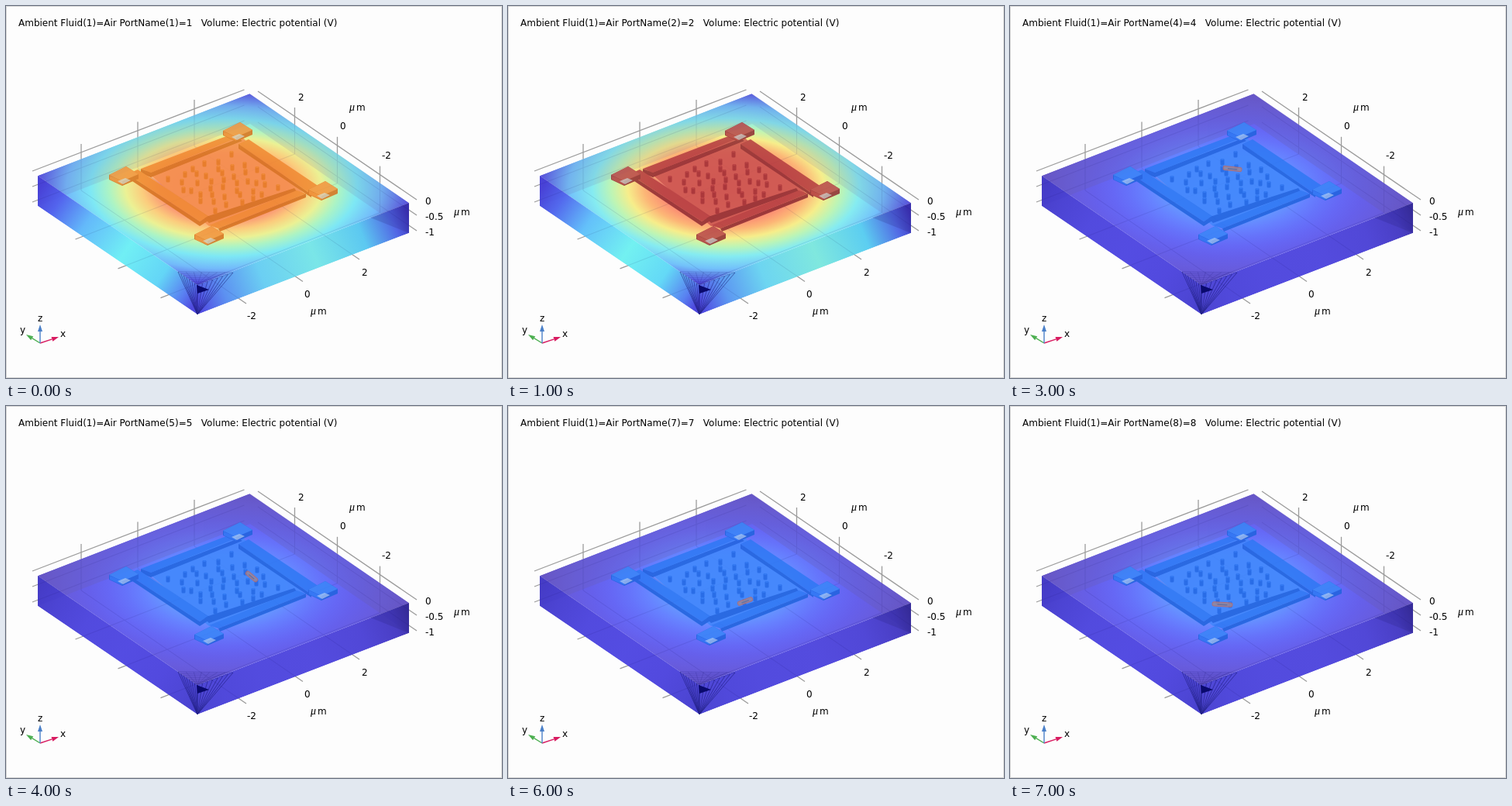
Recreate the animation shown at these times as an HTML page. Size 640 by 480 pixels, loop 8000 ms.

```html
<!DOCTYPE html>
<html lang="en">
<head>
<meta charset="utf-8">
<title>Electric potential sweep</title>
<style>
html, body { margin: 0; width: 100%; height: 100%; overflow: hidden; background: #fdfdfd; }
svg { display: block; width: 640px; height: 480px; }
text { font: 12px "DejaVu Sans", sans-serif; fill: #000; white-space: pre; }
.mu { font: italic 14px "Liberation Serif", serif; }
</style>
</head>
<body>
<svg id="stage" viewBox="0 0 640 480"></svg>
<script>
const svg = document.getElementById('stage');
const STEP = 1000, COUNT = 8;

function add(parent, tag, attrs, text) {
  const el = document.createElementNS('http://www.w3.org/2000/svg', tag);
  for (const k in attrs) el.setAttribute(k, attrs[k]);
  if (text !== undefined) el.textContent = text;
  parent.appendChild(el);
  return el;
}
const group = (attrs = {}, parent = svg) => add(parent, 'g', attrs);
const poly = (parent, points, fill, more) => add(parent, 'polygon', { points, fill, ...more });
const line = (parent, x1, y1, x2, y2, more) => add(parent, 'line', { x1, y1, x2, y2, ...more });

// Palettes: field = radial stops, left/right = wall stops
const fieldAt = [0, .34, .44, .53, .62, .72, .85, 1];
const wallAt = [0, .12, .3, .55, .78, .93, 1];
const palettes = {
  orange: {
    field: ['#f47a55', '#fa8a68', '#fbc873', '#eaf08c', '#a6f3c0', '#74e6f4', '#68b4fa', '#4a46e2'],
    left: ['#3c35d4', '#4658ec', '#58b4fa', '#66eef4', '#58d2f6', '#4c72f0', '#423cdc'],
    right: ['#4340e0', '#5088f0', '#60cbf2', '#70e4e6', '#50c4f0', '#4458e2', '#3227b8'],
    plate: '#f5904f', bar: '#f08a32', dark: '#d67220', pad: '#f2953f', pin: '#e67c22', band: .14
  },
  red: {
    field: ['#f0605a', '#fb8068', '#fcb06c', '#f6ec82', '#b8f4b0', '#7ceaf0', '#68bcfa', '#4a46e2'],
    left: ['#3c35d4', '#465eec', '#58bcfa', '#68f0f0', '#58d6f6', '#4c78f0', '#423cdc'],
    right: ['#4340e0', '#5090f0', '#62d2f0', '#76e6dc', '#50caf0', '#445ce2', '#3227b8'],
    plate: '#cb5550', bar: '#b43c40', dark: '#902c32', pad: '#b8484a', pin: '#a02e34', band: .14
  },
  blue: {
    field: ['#4f9bff', '#5a8eff', '#5b78ff', '#5a68fa', '#5a5cf4', '#5a54ea', '#5c50dc', '#5a48cc'],
    left: ['#3a30c4', '#3f36d0', '#453ddc', '#473fe0', '#453cdc', '#4038d2', '#3c34cc'],
    right: ['#4038d0', '#433bd8', '#463edc', '#473edc', '#443ad4', '#3c30c0', '#3024a0'],
    plate: '#4286fc', bar: '#2f78f4', dark: '#2163de', pad: '#3a86f8', pin: '#2166e4', band: .22
  }
};

const defs = add(svg, 'defs', {});
function gradient(tag, id, attrs, offsets) {
  const g = add(defs, tag, { id, gradientUnits: 'userSpaceOnUse', ...attrs });
  return offsets.map(offset => add(g, 'stop', { offset }));
}
const stops = {
  field: gradient('radialGradient', 'field', { cx: 51, cy: 51, r: 70 }, fieldAt),
  left: gradient('linearGradient', 'left', { x1: 41, y1: 239, x2: 247, y2: 379 }, wallAt),
  right: gradient('linearGradient', 'right', { x1: 247, y1: 379, x2: 520, y2: 273 }, wallAt)
};

// Background and grid
add(svg, 'rect', { x: .5, y: .5, width: 639, height: 479, fill: '#fdfdfd', stroke: '#d6d6d6' });
function drawGrid(parent) {
  for (let i = 0; i < 3; i++) {
    const xa = 97 + 73 * i, ya = 178 - 28.5 * i;
    line(parent, xa, ya, xa, ya + 60);
    line(parent, xa, ya + 60, xa + 213, ya + 206);
    const xb = 372.5 + 55 * i, yb = 131 + 37.8 * i;
    line(parent, xb, yb, xb, yb + 60);
    line(parent, xb, yb + 60, xb - 283, yb + 170);
    const z = 20 * i;
    line(parent, 34, 213 + z, 307.5, 108 + z);
    line(parent, 325, 110 + z, 530, 250 + z);
  }
}
drawGrid(group({ stroke: '#9c9c9c', 'stroke-width': 1.3 }));

// Block of air
const box = group();
const outline = '41,219 315,113 520,254 520,293 247,398 41,258';
poly(box, outline, '#fff', { opacity: .55 });
add(box, 'rect', {
  width: 100, height: 100, fill: 'url(#field)', opacity: .93,
  transform: 'matrix(2.73 -1.06 -2.06 -1.41 247 360)'
});
const bands = group({}, box);
poly(bands, '41,219 315,113 315,152 41,258', '#6a5aa0');
poly(bands, '315,113 520,254 520,293 315,152', '#6a5aa0');
poly(box, '41,219 247,360 247,398 41,258', 'url(#left)', { opacity: .93 });
poly(box, '247,360 520,254 520,293 247,398', 'url(#right)', { opacity: .93 });
drawGrid(group({ stroke: '#302a70', opacity: .1 }, box));
// Hide the part of the overlay that leaves the block
const clip = add(defs, 'clipPath', { id: 'block' });
add(clip, 'polygon', { points: outline });
box.setAttribute('clip-path', 'url(#block)');
poly(box, '470,273 520,254 520,293', '#20186c', { opacity: .18 });

// Fine mesh at the near corner
const mesh = group({ stroke: '#14146a', 'stroke-width': .7, opacity: .7 });
for (let i = 0; i <= 7; i++) {
  const t = i / 7;
  line(mesh, 247, 398, 222 + 25 * t, 343 + 17 * t);
  line(mesh, 247, 398, 247 + 46 * t, 360 - 16 * t);
  line(mesh, 222 + 25 * t, 343 + 17 * t, 293 - 46 * t, 344 + 16 * t, { opacity: .4 });
  line(mesh, 222 + 71 * t, 343 + t, 247, 360, { opacity: .35 });
}
poly(svg, '246,360 262,366 247,371', '#0a0a6e');

// Device
const device = group({ opacity: .86 });
const tinted = [];
function part(points, key, more) {
  tinted.push([poly(device, points, '', more), key]);
}
part('180,212 302,167 385,242 262,284', 'plate');
// rails: top face, then inner or outer walls
part('181,217 300,171 305,174 187,221', 'dark');
part('174,210 287,167 306,167 187,215', 'bar');
part('174,210 187,215 187,221 174,216', 'dark');
part('300,178 313,172 407,235 394,243', 'bar');
part('300,178 394,243 394,247 300,184', 'dark');
part('255,273 372,235 375,239 262,280', 'dark');
part('262,283 375,238 387,242 274,287', 'bar');
part('274,287 387,242 387,247 276,291', 'dark');
part('157,217 170,211 261,271 250,278', 'bar');
part('157,217 250,278 250,284 157,222', 'dark');
part('250,278 261,271 261,277 250,284', 'dark');

for (const [x, y] of [[299, 160], [152, 217], [409, 236], [262, 294]]) {
  const at = (...p) => p.map(([a, b]) => (x + a) + ',' + (y + b)).join(' ');
  part(at([-19, 1], [3, -10], [19, 0], [19, 6], [-2, 15], [-19, 7]), 'dark');
  part(at([-19, 1], [3, -10], [19, 0], [-2, 9]), 'pad');
  part(at([-18, 2], [-2, 9], [-2, 14], [-18, 7]), 'bar');
  poly(device, at([-8, 9], [2, 5], [9, 8], [-1, 13]), '#cfe6f2', { opacity: .62 });
}

// Pins, upper centres
const pins = [
  291, 191, 274, 201, 308, 205, 256, 203, 292, 208, 324, 211, 241, 210, 274, 210, 309, 214,
  332, 220, 231, 217, 258, 219, 279, 215, 294, 220, 209, 223, 246, 216, 265, 226, 281, 224,
  298, 228, 312, 226, 323, 228, 334, 230, 227, 227, 247, 228, 280, 233, 264, 235, 229, 237,
  239, 238, 298, 238, 319, 239, 351, 234, 251, 243, 266, 243, 282, 246, 302, 243, 330, 243,
  251, 251, 268, 252, 284, 256, 305, 253, 319, 248, 270, 264
];
for (let i = 0; i < pins.length; i += 2) {
  const x = pins[i], y = pins[i + 1];
  const pin = add(device, 'rect', { x: x - 2.5, y: y - 4, width: 5, height: 8.5, rx: 1.6 });
  tinted.push([pin, 'pin']);
  const cap = add(device, 'ellipse', { cx: x, cy: y - 3, rx: 2, ry: 1.1 });
  tinted.push([cap, 'bar']);
}

// Active electrode: x, y, angle, length
const spots = [null, null, [254, 214, -17, 25], [287, 210, 6, 24], [317, 220, 40, 18],
  [325, 237, -62, 14], [306, 252, -20, 20], [274, 256, 3, 26]];
const spot = group();
const spotBody = add(spot, 'rect', { y: -2.6, height: 5.2, rx: 2.2, fill: '#9a8798', stroke: '#bd6a68', 'stroke-width': 1, opacity: .85 });
const spotCore = line(spot, 0, .4, 0, .4, { stroke: '#6a6f9c', 'stroke-width': 1.4 });

// Labels
const label = (x, y, s) => add(svg, 'text', { x, y }, s);
const title = label(16, 26, '');
label(377, 122, '2');
label(431, 159, '0');
label(485, 197, '-2');
label(541, 256, '0');
label(541, 276, '-0.5');
label(541, 296, '-1');
label(311, 404, '-2');
label(385, 376, '0');
label(459, 348, '2');
for (const [x, y] of [[443, 135], [578, 270], [393, 398]]) {
  add(svg, 'text', { x, y, class: 'mu' }, 'μ');
  label(x + 9, y, 'm');
}

// Axis triad
function arrow(x, y, color) {
  const dx = x - 44, dy = y - 435, n = Math.hypot(dx, dy), ux = dx / n, uy = dy / n;
  const bx = x - ux * 9, by = y - uy * 9;
  line(svg, 44, 435, bx, by, { stroke: color, 'stroke-width': 1.4 });
  poly(svg, `${x},${y} ${bx - uy * 3},${by + ux * 3} ${bx + uy * 3},${by - ux * 3}`, color);
}
arrow(68, 427, '#d81b60');
arrow(26, 424, '#4caf50');
arrow(44, 411, '#4a7fc8');
label(70, 427, 'x');
label(18, 422, 'y');
label(41, 407, 'z');

let shown = -1;
function show(i) {
  if (i === shown) return;
  shown = i;
  const p = i === 0 ? palettes.orange : i === 1 ? palettes.red : palettes.blue;
  for (const k in stops) stops[k].forEach((s, j) => s.setAttribute('stop-color', p[k][j]));
  for (const [el, k] of tinted) el.setAttribute('fill', p[k]);
  bands.setAttribute('opacity', p.band);
  title.textContent = `Ambient Fluid(1)=Air PortName(${i + 1})=${i + 1}   Volume: Electric potential (V)`;
  const s = spots[i];
  spot.setAttribute('display', s ? 'inline' : 'none');
  if (!s) return;
  const [x, y, angle, len] = s;
  spot.setAttribute('transform', `translate(${x} ${y}) rotate(${angle})`);
  spotBody.setAttribute('x', -len / 2);
  spotBody.setAttribute('width', len);
  spotCore.setAttribute('x1', -len / 4);
  spotCore.setAttribute('x2', len / 4);
}

const start = performance.now();
function tick(now) {
  show(Math.floor(Math.max(0, now - start) / STEP) % COUNT);
  requestAnimationFrame(tick);
}
show(0);
requestAnimationFrame(tick);
</script>
</body>
</html>
```
